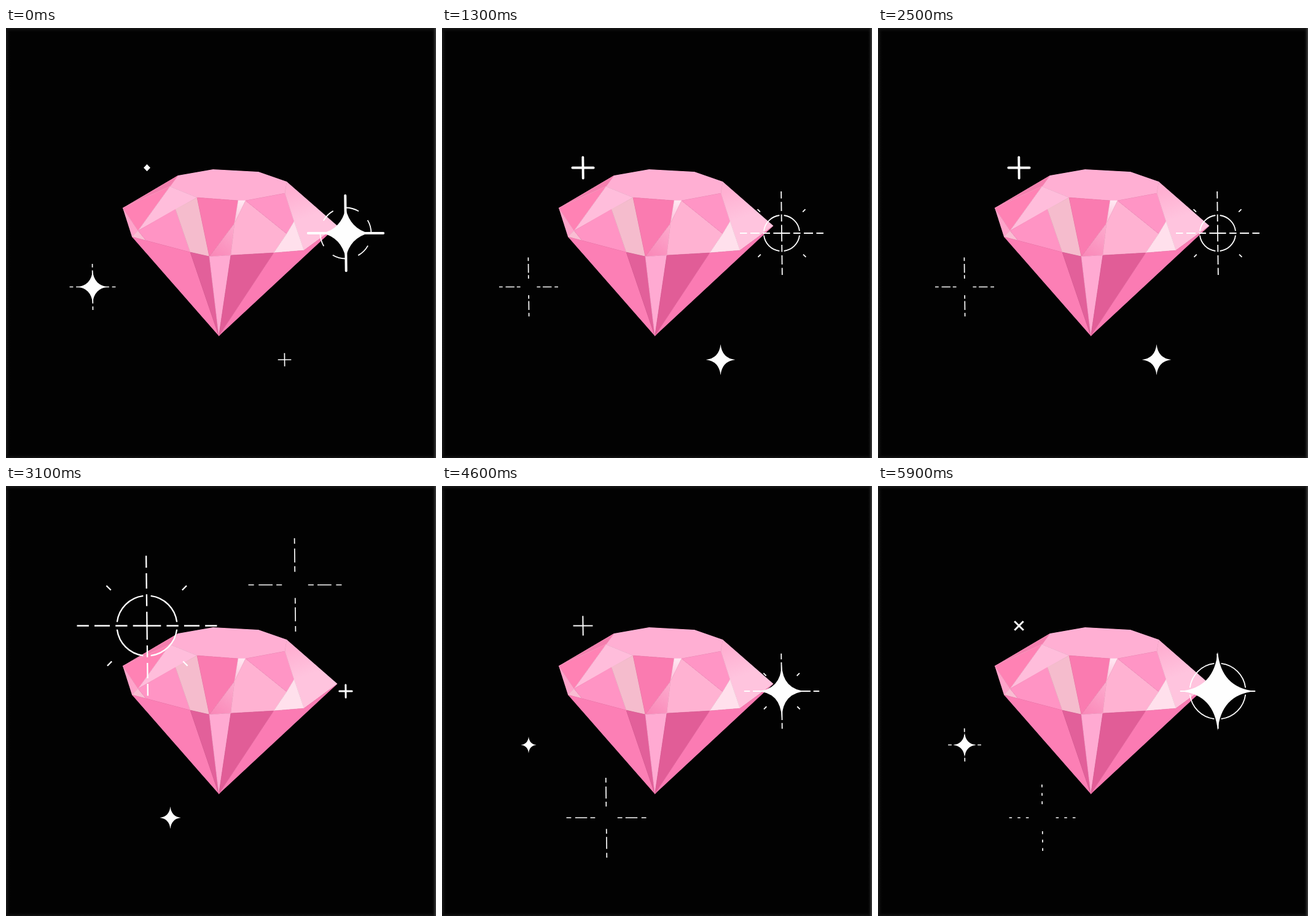
These frames come from a looping animation (700x700 px, 6000 ms). An HTML page with a canvas:

```html
<!DOCTYPE html>
<html lang="en">
<head>
<meta charset="utf-8">
<title>Sparkling diamond</title>
<style>
html, body { margin: 0; width: 100%; height: 100%; overflow: hidden; background: #020202; }
canvas { display: block; width: 700px; height: 700px; }
</style>
</head>
<body>
<canvas id="stage" width="700" height="700"></canvas>
<script>
const ctx = document.getElementById('stage').getContext('2d');
const SIZE = 700, STEP = 100, STEPS = 12, LEAN = .012;

const corners = {
  a: [190, 293], b: [280, 240], c: [337, 230], d: [411, 234], e: [457, 250], f: [539.5, 322],
  g: [485, 362], h: [346.5, 501.5], i: [205, 340], j: [267, 258], k: [311, 276], l: [378, 281],
  m: [390, 281], n: [454, 269], o: [469, 315], p: [457, 335], q: [436, 366], r: [366, 370],
  s: [331, 372], t: [300, 365], u: [228, 346], v: [215, 330], w: [276, 295], x: [372, 318],
  z: [222, 279]
};
const outline = 'abcdefhi';

// A second colour makes a gradient from the first corner to the last.
const facets = [
  ['abcdenmlkj', '#ffafd3'], ['abj', '#f47fae'], ['azj', '#fbafcb'], ['azjv', '#ff82b4'],
  ['jkv', '#ffbddb'], ['avi', '#ffa3ca'], ['ivu', '#f9bdd3'], ['vwtu', '#ff94c4'],
  ['wkst', '#f5bccd'], ['klxs', '#fa7bb0'], ['lmx', '#ffe8f2', '#ffbcd8'],
  ['srx', '#f986b7', '#fdacce'], ['mpqrx', '#ffb2d2'], ['mnop', '#ff95c5'],
  ['nefgo', '#ffb0d2', '#ffc4de'], ['ogqp', '#ffe0ec'],
  ['iuth', '#fc7fb5'], ['tsh', '#e2609a'], ['srh', '#ffaad2'], ['rqh', '#e15d97'], ['qgfh', '#fb7bb3']
];

const sparkles = [
  { x: 229.5, y: 227.5, reach: 114, draw: drawBurst, birth: 10 },
  { x: 553, y: 334, reach: 68, draw: drawBurst, birth: 4 },
  { x: 470.5, y: 161, reach: 76, draw: drawTwinkle, birth: 3 },
  { x: 141, y: 421.5, reach: 48, draw: drawTwinkle, birth: 9 },
  { x: 267.5, y: 540, reach: 65, draw: drawTwinkle, birth: 6 },
  { x: 453.5, y: 540, reach: 90, draw: drawTwinkle, birth: 0 }
];

function line(x1, y1, x2, y2) {
  ctx.beginPath();
  ctx.moveTo(x1, y1);
  ctx.lineTo(x2, y2);
  ctx.stroke();
}

function star(radius, plump = .1) {
  const height = radius * 1.06, c = radius * plump;
  ctx.beginPath();
  ctx.moveTo(0, -height);
  ctx.quadraticCurveTo(c, -c, radius, 0);
  ctx.quadraticCurveTo(c, c, 0, height);
  ctx.quadraticCurveTo(-c, c, -radius, 0);
  ctx.quadraticCurveTo(-c, -c, 0, -height);
  ctx.fill();
}

// Four spokes drawn from the tip inwards, so that dashes line up at the tips.
function spokes(inner, outer, turn = 0) {
  ctx.save();
  ctx.transform(1, 0, LEAN, 1, 0, 0);
  ctx.rotate(turn);
  for (let i = 0; i < 4; i++) {
    line(outer, 0, inner, 0);
    ctx.rotate(Math.PI / 2);
  }
  ctx.restore();
}

function dashes(reach, ...parts) {
  ctx.setLineDash(parts.map(part => part * reach));
}

// Evenly spaced arcs, each covering the given share of its sector.
function ring(radius, count, share) {
  const sector = 2 * Math.PI / count;
  for (let i = 0; i < count; i++) {
    const middle = Math.PI / 4 + i * sector, half = sector * share / 2;
    ctx.beginPath();
    ctx.arc(0, 0, radius, middle - half, middle + half);
    ctx.stroke();
  }
}

// Grows as a star, opens into a dashed cross, then breaks up.
function drawTwinkle(age, reach) {
  if (age > 5) return;
  const outer = reach * (age < 5 ? .12 + .22 * age : .83);
  ctx.lineWidth = 1.7;
  if (age === 0) return spokes(0, outer);
  if (age < 4) star(reach * (.14 + .125 * age));
  if (age === 1) return;
  if (age === 5) dashes(reach, .07, .14);
  else dashes(reach, .12, .1, .3, .08);
  spokes(reach * (age < 4 ? .3 : .24), outer);
}

// A spinning plus shrinks to a speck, swells into a ringed star and bursts.
function drawBurst(age, reach) {
  const weight = Math.sqrt(reach / 68);
  const quarter = Math.PI / 4;
  ctx.lineWidth = 1.8 * weight;
  if (age < 2) {
    ctx.lineWidth = 2 + age;
    spokes(0, reach * (.14 - .05 * age), age * quarter);
  } else if (age === 2) {
    star(reach * .048, .5);
  } else if (age === 3) {
    ctx.lineWidth = 3 * weight;
    ctx.lineCap = 'round';
    spokes(0, reach * .15);
  } else if (age < 8) {
    star(reach * (.28 + .61 * ((age - 4) / 3) ** 1.5), age === 7 ? .09 : .03);
  } else if (age === 8) {
    star(reach * .55, .2);
    ctx.lineWidth = 4 * weight;
    ctx.lineCap = 'round';
    spokes(reach * .35, reach * .9);
    ctx.lineCap = 'butt';
  } else {
    const left = 1 - .32 * (age - 9);
    dashes(reach, .17, .08, .22, .08 + .2 * (age - 9));
    spokes(reach * (age - 9) * .1, reach * left);
    ctx.setLineDash([]);
  }

  ctx.lineWidth = 1.8 * weight;
  if (age >= 7 && age <= 9) {
    ring(reach * (.67 - .06 * (age - 7) ** 2), age === 8 ? 6 : 4, age === 8 ? .52 : .84);
  }
  if (age === 6 || age === 9) {
    const ticks = age === 6 ? .52 : .72;
    spokes(reach * ticks, reach * (ticks + .09), quarter);
  }
  if (age === 6 || age === 7) {
    dashes(reach, .14, .07, 1);
    spokes(reach * .4, reach * .9);
  }
}

function tracePolygon(names) {
  ctx.beginPath();
  for (const name of names) ctx.lineTo(...corners[name]);
  ctx.closePath();
}

function drawDiamond() {
  ctx.save();
  tracePolygon(outline);
  ctx.clip();
  ctx.lineWidth = .6;
  for (const [names, color, endColor = color] of facets) {
    const shade = ctx.createLinearGradient(...corners[names[0]], ...corners[names.at(-1)]);
    shade.addColorStop(0, color);
    shade.addColorStop(1, endColor);
    ctx.fillStyle = ctx.strokeStyle = shade;
    tracePolygon(names);
    ctx.fill();
    ctx.stroke();
  }
  ctx.restore();
}

function drawEdge(x1, y1, x2, y2, color) {
  const fade = ctx.createLinearGradient(x1, y1, x2, y2);
  fade.addColorStop(0, color);
  fade.addColorStop(1, 'rgba(2,2,2,0)');
  ctx.fillStyle = fade;
  ctx.fillRect(0, 0, SIZE, SIZE);
}

function drawBackground() {
  ctx.fillStyle = '#020202';
  ctx.fillRect(0, 0, SIZE, SIZE);
  drawEdge(0, 0, 8, 0, '#1c1c1c');
  drawEdge(0, 0, 0, 8, '#1c1c1c');
  drawEdge(0, SIZE, 0, SIZE - 7, '#161616');
  drawEdge(SIZE, 0, SIZE - 7, 0, '#444');
}

function frame(now) {
  const step = Math.floor(now / STEP) % STEPS;
  drawBackground();
  drawDiamond();
  for (const { x, y, reach, draw, birth } of sparkles) {
    ctx.save();
    ctx.translate(x, y);
    ctx.fillStyle = ctx.strokeStyle = '#fefefe';
    draw((step - birth + STEPS) % STEPS, reach);
    ctx.restore();
  }
  requestAnimationFrame(frame);
}
requestAnimationFrame(frame);
</script>
</body>
</html>
```
